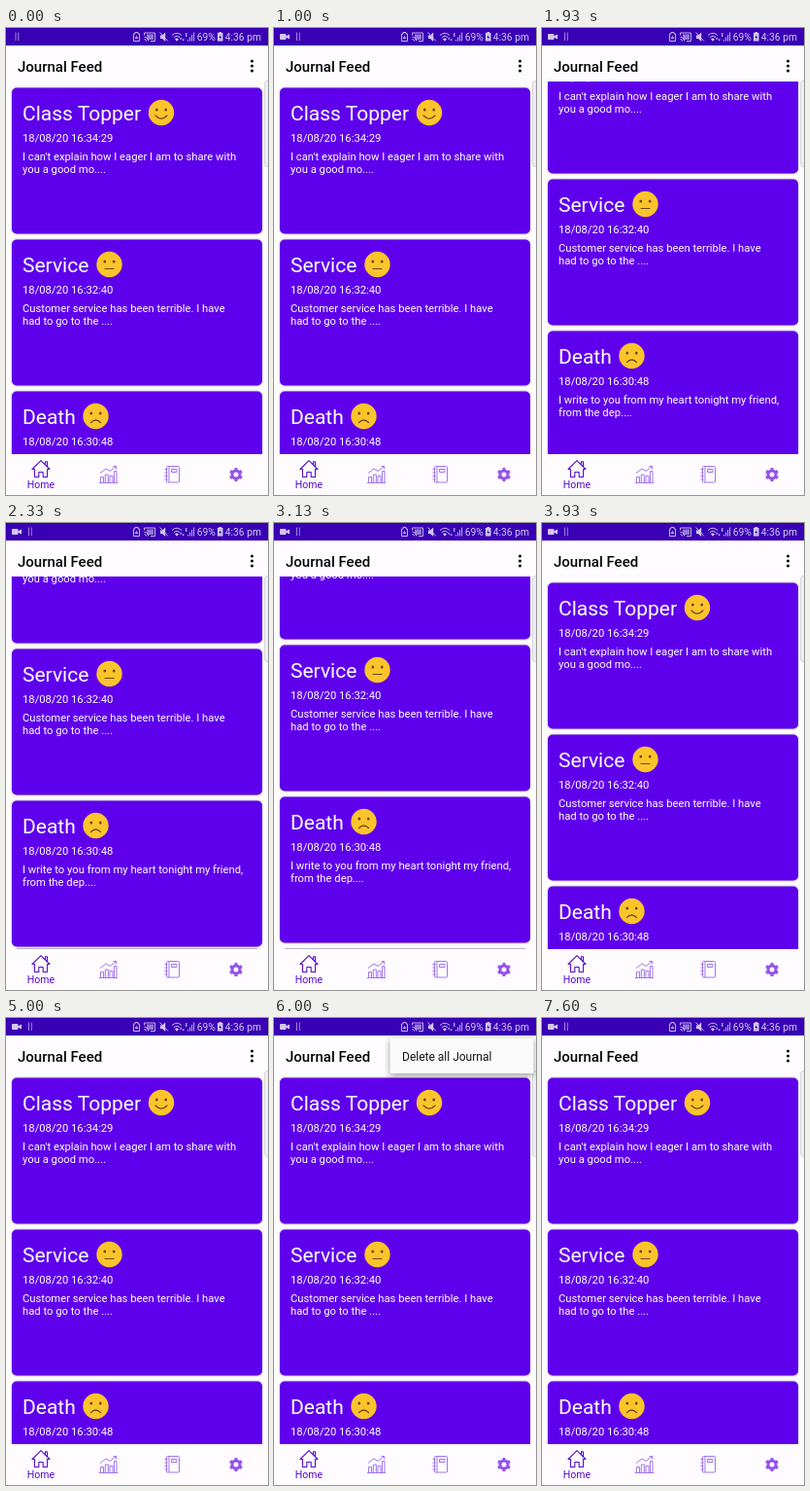
An HTML page that plays this animation: 270x480 px, repeating every 8000 ms.

```html
<!DOCTYPE html>
<html lang="en">
<head>
<meta charset="utf-8">
<title>Journal Feed</title>
<style>
  html, body { margin: 0; width: 100%; height: 100%; overflow: hidden; background: #fefcff; }
  svg { display: block; width: 100%; height: 100%; }
  text { font-family: Roboto, "Open Sans", sans-serif; white-space: pre; }
  .card rect { fill: #5f00ec; filter: drop-shadow(0 .7px .9px rgba(0, 0, 0, .35)); }
  .card text { fill: #fff; font-size: 11.25px; }
  .card .heading { font-size: 21px; }
  .face { fill: none; stroke: #6b4a20; stroke-width: 1.2; stroke-linecap: round; }
  .status { fill: #d3c7f0; stroke: none; }
  .status text { font-size: 10.3px; }
  .line { fill: none; stroke: #d3c7f0; stroke-width: .9; }
  .nav { fill: none; stroke: #a274ee; stroke-width: 1; stroke-linejoin: round; }
  #popup rect { fill: #fafafa; filter: drop-shadow(0 2px 3px rgba(0, 0, 0, .4)); }
</style>
</head>
<body>
<svg viewBox="0 0 270 480" preserveAspectRatio="none">
  <defs><clipPath id="feedArea"><rect y="55" width="270" height="383"/></clipPath></defs>
  <rect width="270" height="480" fill="#fefcff"/>

  <rect x="11" y="437" width="248" height="1" fill="#b9b0cb"/>
  <g clip-path="url(#feedArea)"><g id="feed"></g></g>
  <rect x="266.5" y="54.5" width="7" height="88" rx="2.5" fill="#f0edf2" stroke="#d2ced6" stroke-width=".8"/>

  <text x="12" y="44.800" font-size="15" font-weight="500" fill="#050308">Journal Feed</text>
  <g fill="#111"><circle cx="253.5" cy="34" r="1.6"/><circle cx="253.5" cy="39" r="1.6"/><circle cx="253.5" cy="44" r="1.6"/></g>

  <rect width="270" height="18" fill="#3900b4"/>
  <g class="status">
    <path id="camera" d="M7 6h4.500q1 0 1 1v1.300l3.500-1.800v5l-3.500-1.800v1.300q0 1-1 1H7q-1 0-1-1V7q0-1 1-1z"/>
    <path id="bars" class="line" d="M10 4.500v8.500M12.800 4.500v8.500" opacity=".75"/>
    <path class="line" d="M133 6V4.500h3V6h1.500v7.500h-6V6zM133.300 10.500l1.200-2 1.200 2z"/>
    <path class="line" d="M142.500 7.500V5h11v8.500h-4.500M142.500 9.300a4.200 4.200 0 0 1 4.200 4.200M142.500 11.500a2 2 0 0 1 2 2"/>
    <rect x="145" y="6.500" width="7" height="5.500" opacity=".6"/>
    <path d="M159 7.500h2l3.200-3v9.500l-3.200-3h-2z"/>
    <path class="line" d="M158.500 4.500l8.500 9"/>
    <path class="line" d="M171 7.500q5-4.500 10 0M172.800 9.600q3.200-2.800 6.400 0"/>
    <path d="M174 11.200q2-1.600 4 0l-2 2.500zM179 11.500l1.200-2 1.200 2zM181.500 11.500l1.200 2 1.200-2z"/>
    <path opacity=".75" d="M185 5h1.500v4h-1.500zM187 12h1.200v1.500h-1.200zM189 9.500h1.200v4h-1.200zM191 7h1.200v6.500h-1.200zM193 4.500h1.200v9h-1.200z"/>
    <text x="196.800" y="13.200">69%</text>
    <path d="M219.500 5V4h2.500v1h1.500v8.500h-5.500V5z"/>
    <path d="M221.300 6.500l-2 3.500h1.500l-.6 2.500 2-3.500h-1.500z" fill="#3900b4"/>
    <text x="263" y="13.300" text-anchor="end">4:36 pm</text>
  </g>

  <path class="nav" d="M27 453.500l9-8.800 9 8.800h-2.500v8h-4.300v-5h-4.400v5h-4.300v-8zM40.500 448.700v-3h2v5" style="stroke:#560dd0;stroke-width:1.100"/>
  <text x="36" y="472.500" font-size="10.500" text-anchor="middle" fill="#5606d1">Home</text>
  <path class="nav" d="M96 467.500h19M97.500 467v-5.500h3v5.500M102.300 467v-8h3v8M107 467v-6.500h3v6.500M111.500 467v-11.500h2.500V467M97 457.500l6-4.500 4 2.500 6.500-5M110.500 450.500h3v3"/>
  <path class="nav" d="M166.500 450.500h11q1 0 1 1v14.500q0 1-1 1h-11q-1 0-1-1v-14.500q0-1 1-1zM168 450.500V467M163.500 453.500h3M163.500 457h3M163.500 460.500h3M163.500 464h3M170.500 453.500h5.500v3h-5.500z"/>
  <g fill="none" stroke="#9550ea">
    <circle cx="237" cy="459" r="4" stroke-width="3"/>
    <circle cx="237" cy="459" r="6" stroke-width="2" pathLength="12" stroke-dasharray="1 1" stroke-dashoffset="-.5"/>
  </g>

  <g id="popup">
    <rect x="119.500" y="20.500" width="148" height="36.500" rx="1"/>
    <text x="132" y="43.500" font-size="12" fill="#171419">Delete all Journal</text>
  </g>
</svg>
<script>
const LOOP = 8000, STEP = 1000 / 15;
const byId = id => document.getElementById(id);

const entries = [
  { title: "Class Topper", time: "16:34:29", faceX: 160, mouth: "M-6 3Q0 9 6 3",
    lines: ["I can't explain how I eager I am to share with", "you a good mo...."] },
  { title: "Service", time: "16:32:40", faceX: 106.5, mouth: "M-4.500 4.500H4.500",
    lines: ["Customer service has been terrible. I have", "had to go to the ...."] },
  { title: "Death", time: "16:30:48", faceX: 92.5, mouth: "M-5 6.500Q0 1.500 5 6.500",
    lines: ["I write to you from my heart tonight my friend,", "from the dep...."] }
];

const card = ({ title, time, faceX, mouth, lines }, i) => `
  <g class="card" transform="translate(0 ${61.5 + 156 * i})">
    <rect x="6" width="258" height="150" rx="5"/>
    <text class="heading" x="17" y="33.500">${title}</text>
    <g transform="translate(${faceX} 25.500)">
      <circle r="13.200" fill="#fbc42b"/>
      <ellipse cx="-4.700" cy="-3" rx="1.400" ry="1.600" fill="#6b4a20"/>
      <ellipse cx="4.700" cy="-3" rx="1.400" ry="1.600" fill="#6b4a20"/>
      <path class="face" d="${mouth}"/>
    </g>
    <text x="17" y="55.500">18/08/20 ${time}</text>
    ${lines.map((line, n) => `<text x="17" y="${74.5 + 13.2 * n}">${line}</text>`).join("")}
  </g>`;
byId("feed").innerHTML = entries.map(card).join("");

const scrollKeys = [[1600, 0], [1930, 62], [2200, 84], [2470, 92], [3135, 92], [3600, 33], [3800, 3], [3870, 0]];

function track(keys, t) {
  if (t <= keys[0][0]) return keys[0][1];
  for (let i = 1; i < keys.length; i++) {
    const [t0, a] = keys[i - 1], [t1, b] = keys[i];
    if (t <= t1) return a + (b - a) * (t - t0) / (t1 - t0);
  }
  return keys[keys.length - 1][1];
}

function draw(now) {
  // The screen refreshes 15 times a second.
  const t = Math.floor((now % LOOP + 5) / STEP) * STEP;
  byId("feed").setAttribute("transform", `translate(0 ${-Math.round(track(scrollKeys, t))})`);

  const recording = Math.min(1, t / 265);
  byId("camera").setAttribute("opacity", recording);
  byId("bars").setAttribute("transform", `translate(${13.5 * recording} 0)`);

  const shown = t < 5730 || t > 7595 ? 0 : t > 7525 ? 0.5 : 1;
  byId("popup").setAttribute("opacity", shown);
}

const start = performance.now();
function tick() {
  draw(performance.now() - start);
  requestAnimationFrame(tick);
}
tick();
</script>
</body>
</html>
```
